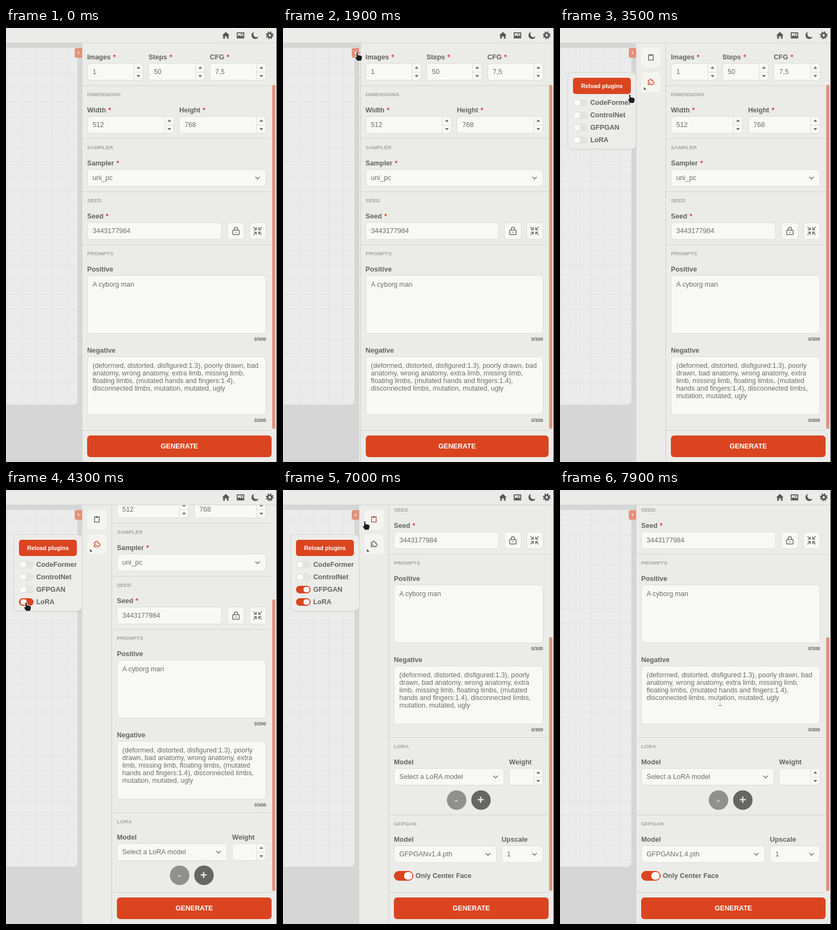
These frames come from a looping animation (501 px wide and 802 px high, 8000 ms). An HTML page:

```html
<!DOCTYPE html>
<html lang="en">
<head>
<meta charset="utf-8">
<title>Image generation panel</title>
<style>
  * { box-sizing: border-box; }
  html, body { margin: 0; width: 100%; height: 100%; overflow: hidden; }
  #stage { --w: 0px; --red: #da4520; --line: #d2d2cf; position: relative; width: 501px; height: 802px; overflow: hidden;
    background: #d6d6d6; color: #636361; font: 12.6px/14px "Liberation Sans", Arial, sans-serif; white-space: nowrap; }
  #stage div, #stage b, #stage > svg { position: absolute; }
  svg { display: block; fill: none; stroke: currentColor; stroke-width: 2; overflow: visible; }
  .solid { fill: currentColor; stroke: none; }
  #top { width: 501px; height: 28px; background: #ebebea; border-bottom: 1px solid #d3d3d1; }
  #top svg { position: absolute; top: 6px; width: 15px; height: 15px; color: #585856; }
  #board { left: -10px; top: 37px; width: 142px; height: 659px; border-radius: 0 0 7px; background: #ebebeb;
    background-image: linear-gradient(90deg, #e0e0e0 1.3px, transparent 1.3px), linear-gradient(#e0e0e0 1.3px, transparent 1.3px);
    background-size: 27.3px 27.3px; background-position: 12px 18px; }
  #panel { left: 141px; top: 28px; width: 360px; height: 774px; background: #ebebe8; }
  #tab { left: 127px; top: 37px; width: 14px; height: 18px; border-radius: 4px 0 0 4px; background: #e0937d;
    color: #fff; font: bold 11px/17px "Liberation Sans", sans-serif; text-align: center; }
  .tool { border-radius: 6px; background: #f4f4f0; }
  .tool svg { position: absolute; left: 50%; top: 47%; translate: -50% -50%; }
  #corner { border: solid transparent; border-width: 5px 0 0 5px; border-left-color: #585856; }
  #view { left: calc(140px + var(--w)); top: 28px; right: 10px; height: 715px; border-left: 1px solid #cfcfcc; overflow: hidden; background: #ebebe8; }
  #form { inset: 0; }
  #stage .sec { left: 0; right: 0; border-top: 1px solid var(--line); }
  .sec b { left: 9px; top: 9px; font-size: 9.8px; color: #a5a5a2; }
  .row { left: 9px; right: 10px; display: grid; gap: 9.3px; }
  .row > span { min-width: 0; }
  .row label { display: block; height: 22px; font-weight: bold; line-height: 22px; }
  .row i { color: #d23a3a; font-style: normal; margin-left: 1px; }
  #stage .box { position: relative; height: 32px; padding: 0 9px; line-height: 30px; border: 1px solid #dcdcd8;
    border-radius: 6px; background: #f8f8f5; color: #6c6c6a; overflow: hidden; }
  #stage .area { height: 108px; padding: 9px 9px; line-height: 14px; white-space: normal; }
  .spin { right: 0; top: 0; width: 17px; height: 30px; border-left: 1px solid #dcdcd8; background: linear-gradient(#dcdcd8, #dcdcd8) 0 15px / 100% 1px no-repeat; }
  .spin svg { width: 16px; height: 30px; }
  .box > svg { position: absolute; right: 10px; top: 10px; width: 10px; height: 10px; }
  #stage .icon { padding: 0; } 
  #stage .icon svg { right: 6px; top: 6px; width: 18px; height: 18px; }
  .count { right: 10px; font: bold 8.8px/12px "Liberation Sans", sans-serif; }
  .round { width: 36px; height: 36px; border-radius: 50%; background: #666663; color: #e6e6e3; font: bold 22px/35px "Liberation Sans", sans-serif; text-align: center; }
  .switch { border-radius: 9px; background: #e3e3e0; }
  .switch.on { background: var(--red); }
  .switch div { border-radius: 40%; background: #fbfbf9; }
  .button { border-radius: 6px; background: var(--red); color: #fff; font-weight: bold; text-align: center; }
  #foot { left: calc(140px + var(--w)); top: 743px; right: 10px; height: 59px; border: solid #cfcfcc; border-width: 1px 0 0 1px; background: #ebebe8; }
  #foot .button { left: 9px; right: 0; top: 9px; height: 40px; line-height: 40px; }
  #thumb { left: 492px; width: 6px; border-radius: 3px; background: #e0947e; }
  #popup { left: 14px; top: 82px; width: 127px; height: 142px; border: 1px solid #d6d6d3; border-radius: 8px; background: #ececea; box-shadow: 0 1px 3px #0001; }
  #popup .button { left: 9px; top: 9px; width: 107px; height: 30px; font-size: 10.75px; line-height: 30px; border-radius: 5px; }
  #popup b { left: 41px; }
  #edge { left: 500px; top: 0; width: 1px; height: 802px; background: #2a1920; }
</style>
</head>
<body>
<div id="stage"></div>
<script>
const svg = (body, attrs = '') => `<svg viewBox="0 0 24 24" ${attrs}>${body}</svg>`;
const path = (d, attrs = '') => `<path d="${d}" ${attrs}/>`;
const chevron = svg(path('M2 7l10 10L22 7', 'stroke-width="3.4"'));
const spin = `<div class="spin"><svg viewBox="0 0 16 30" class="solid">${path('M4.5 9L8 5l3.5 4zM4.5 21l3.5 4 3.5-4z')}</svg></div>`;

const sec = (y, title) => `<div class="sec" style="top:${y - 28}px"><b>${title}</b></div>`;
const row = (y, cols, ...cells) => `<div class="row" style="top:${y - 39}px;grid-template-columns:${cols}">${cells.join('')}</div>`;
const field = (name, content, kind = '') => `<span><label>${name.replace('*', '<i>*</i>')}</label><div class="box ${kind}">${content}</div></span>`;
const number = (name, value) => field(name, value + spin);
const select = (name, value) => field(name, value + chevron);
const area = (y, name, text) => row(y, '1fr', field(name, text, 'area')) + `<div class="count" style="top:${y + 95}px">0/300</div>`;
const toggle = (id, x, y, w, h) => `<div class="switch" id="${id}" style="left:${x}px;top:${y}px;width:${w}px;height:${h}px">
  <div style="top:2px;left:2px;width:${h - 3}px;height:${h - 4}px"></div></div>`;

const lock = svg('<rect x="4" y="10" width="16" height="11" rx="1.5"/>' + path('M8 10V7a4 4 0 0 1 8 0v3M12 14v3'));
const shrink = svg(path('M2 2l7 7M3 9h6V3M22 2l-7 7M21 9h-6V3M2 22l7-7M3 15h6v6M22 22l-7-7M21 15h-6v6'));
const clipboard = path('M8 4H4v18h16V4h-4', 'stroke-width="2.4"') + '<rect x="8" y="2" width="8" height="5" class="solid"/>';
const puzzle = path('M3 8h5c-2-7 8-7 6 0h5v5c6-2 6 8 0 6v4h-6c1-6-6-6-5 0H3v-6c5 1 5-5 0-4z', 'stroke-width="2.2"');
const topIcons = [
  path('M1 12L12 2l11 10h-3v10h-5v-7H9v7H4V12z', 'class="solid"'),
  path('M1 3h22v18H1zM4 6v10l5-5 4 4 3-3 4 4V6z', 'class="solid" fill-rule="evenodd"') + '<circle cx="15" cy="9" r="2" class="solid"/>',
  path('M22 15A10.5 10.5 0 1 1 9.500 2 8.500 8.500 0 0 0 22 15z', 'class="solid"'),
  '<circle cx="12" cy="12" r="6" stroke-width="5"/><circle cx="12" cy="12" r="9.5" stroke-width="4" stroke-dasharray="3.73"/>'
];
const plugins = ['CodeFormer', 'ControlNet', 'GFPGAN', 'LoRA'];
const negative = '(deformed, distorted, disfigured:1.3), poorly drawn, bad anatomy, wrong anatomy, extra limb, missing limb, ' +
  'floating limbs, (mutated hands and fingers:1.4), disconnected limbs, mutation, mutated, ugly';

const $ = id => document.getElementById(id);
const stage = $('stage');
stage.innerHTML = `
<div id="board"></div><div id="panel"></div>
<div class="tool" id="clip">${svg(clipboard)}</div><div class="tool" id="puzzle">${svg(puzzle)}</div>
<div id="corner"></div>
<div id="view"><div id="form">
  ${row(54, '1fr 1fr 1fr', number('Images *', 1), number('Steps *', 50), number('CFG *', '7,5'))}
  ${sec(106, 'DIMENSIONS')}${row(152, '1fr 1fr', number('Width *', 512), number('Height *', 768))}
  ${sec(204, 'SAMPLER')}${row(250, '1fr', select('Sampler *', 'uni_pc'))}
  ${sec(302, 'SEED')}${row(348, '1fr 32px 31px', field('Seed *', '3443177984'), field('', lock, 'icon'), field('', shrink, 'icon'))}
  ${sec(400, 'PROMPTS')}${area(446, 'Positive', 'A cyborg man')}${area(596, 'Negative', negative)}
  <div id="lora" style="left:0;right:0">${sec(739, 'LORA')}
    ${row(785, '246fr 76fr', select('Model', 'Select a LoRA model'), number('Weight', ''))}
    <div class="round" style="left:calc(50% - 41px);top:809px;background:#90908d;color:#c4c4c1">-</div>
    <div class="round" style="left:calc(50% + 4px);top:809px">+</div></div>
  <div id="gfpgan" style="left:0;right:0">${sec(882, 'GFPGAN')}
    ${row(928, '229fr 93fr', select('Model', 'GFPGANv1.4.pth'), select('Upscale', 1))}
    ${toggle('center', 9, 958, 36, 18)}<b style="left:49px;top:960px">Only Center Face</b></div>
</div></div>
<div id="foot"><div class="button">GENERATE</div></div>
<div id="thumb"></div><div id="tab"></div>
<div id="popup"><div class="button">Reload plugins</div>
  ${plugins.map((name, i) => toggle(name, 9, 48 + 23 * i, 27, 14) + `<b style="top:${48 + 23 * i}px">${name}</b>`).join('')}</div>
<div id="top">${topIcons.map((icon, i) => svg(icon, `style="left:${398.500 + 27 * i}px"`)).join('')}</div>
<div id="edge"></div>
<svg id="cursor" width="24" height="24"><path stroke="#fff" stroke-width="1" fill="#1c1c1c"/></svg>`;

const pointers = {
  arrow: 'M0 0v14l3.300-3 2.200 5 2.200-1-2.200-4.800h4.500z',
  hand: 'M-1.500 1.500Q0-1 1.800 1.500V6Q3.500 5 4.500 6.500 6 5.500 7 7q2-.5 2.300 1.500v4L7.500 17H0l-4-6.500Q-4.500 8-1.500 9.500z',
  text: 'M-3.500-6.500H-1l1 1 1-1h2.500v1.500H1.200L.7-4v8l.5 1h2.300v1.500H1l-1-1-1 1h-2.500V5h2.300l.5-1v-8l-.5-1h-2.300z'
};
// time, x, y of the pointer's hot spot
const moves = [[500, 505, 430], [900, 110, 112], [1250, 137, 44], [2150, 137, 44], [2560, 161, 95], [3300, 161, 95],
  [3900, 40, 199], [4150, 37, 207], [4750, 37, 207], [5000, 56, 194], [5400, 39, 180], [5850, 39, 180], [6350, 300, 290],
  [6550, 300, 290], [7000, 151, 57], [7250, 137, 44], [7450, 137, 44], [7850, 296, 393], [8000, 296, 393]];

const ease = (t, a, b) => { const p = Math.min(1, Math.max(0, (t - a) / (b - a))); return p * p * (3 - 2 * p); };
const lerp = (a, b, p) => a + (b - a) * p;
const heat = p => `rgb(${lerp(88, 222, p)},${lerp(88, 70, p)},${lerp(86, 40, p)})`;
const place = (id, props) => { for (const k in props) $(id).style[k] = props[k] + 'px'; };

function setSwitch(id, on, slide, travel) {
  $(id).classList.toggle('on', on);
  $(id).firstElementChild.style.left = 2 + travel * slide + 'px';
}

function drawTools(open) {
  const size = 36 * open, x = lerp(141.500, 168, open), shown = open > 0;
  [['clip', lerp(32, 55, open)], ['puzzle', lerp(42, 100, open)]].forEach(([id, y]) => {
    place(id, { left: x - size / 2, top: y - size / 2, width: size, height: size });
    const icon = $(id).firstElementChild;
    icon.style.width = icon.style.height = lerp(4, 13, open) + 'px';
    $(id).hidden = !shown;
  });
  place('corner', { left: lerp(144, 155, open), top: lerp(41, 109, open) });
  $('corner').hidden = !shown;
}

function drawCursor(t, width) {
  const i = Math.max(1, moves.findIndex(m => m[0] > t));
  const [a, b] = [moves[i - 1], moves[i]], p = ease(t, a[0], b[0]);
  const x = lerp(a[1], b[1], p), y = lerp(a[2], b[2], p);
  const overText = t > 5850 && x > 150 + width && (y > 175 && y < 283 || y > 325 && y < 433);
  const kind = overText ? 'text' : x < 178 && y < 225 && t > 1100 ? 'hand' : 'arrow';
  const cursor = $('cursor');
  cursor.style.visibility = t < moves[0][0] ? 'hidden' : 'visible';
  cursor.setAttribute('viewBox', '0 0 24 24');
  place('cursor', { left: x, top: y });
  cursor.firstElementChild.setAttribute('d', pointers[kind]);
}

function draw(t) {
  const open = ease(t, 1835, 2335) - ease(t, 7380, 7800);
  const lora = t >= 4270, gfpgan = t >= 5670;
  stage.style.setProperty('--w', 55 * open + 'px');
  $('tab').textContent = open > 0.5 ? '›' : '‹';
  drawTools(open);
  $('clip').style.color = heat(ease(t, 6920, 7080) - ease(t, 7100, 7250));
  $('puzzle').style.color = heat(ease(t, 2520, 2680) - ease(t, 5950, 6100));

  const popup = ease(t, 2700, 2860) - ease(t, 7380, 7520);
  $('popup').style.opacity = popup;
  setSwitch('LoRA', lora, ease(t, 4280, 4450), 12);
  setSwitch('GFPGAN', gfpgan, ease(t, 5680, 5850), 12);
  setSwitch('center', true, 1, 17);

  $('lora').hidden = !lora;
  $('gfpgan').hidden = !gfpgan;
  place('form', { top: gfpgan ? -282 : lora ? -143 : 0 });
  const thumbTop = gfpgan ? 272 : lora ? 202 : 105;
  place('thumb', { top: thumbTop, height: 741 - thumbTop });
  drawCursor(t, 55 * open);
}

function tick() {
  draw(performance.now() % 8000);
  requestAnimationFrame(tick);
}
tick();
</script>
</body>
</html>
```
